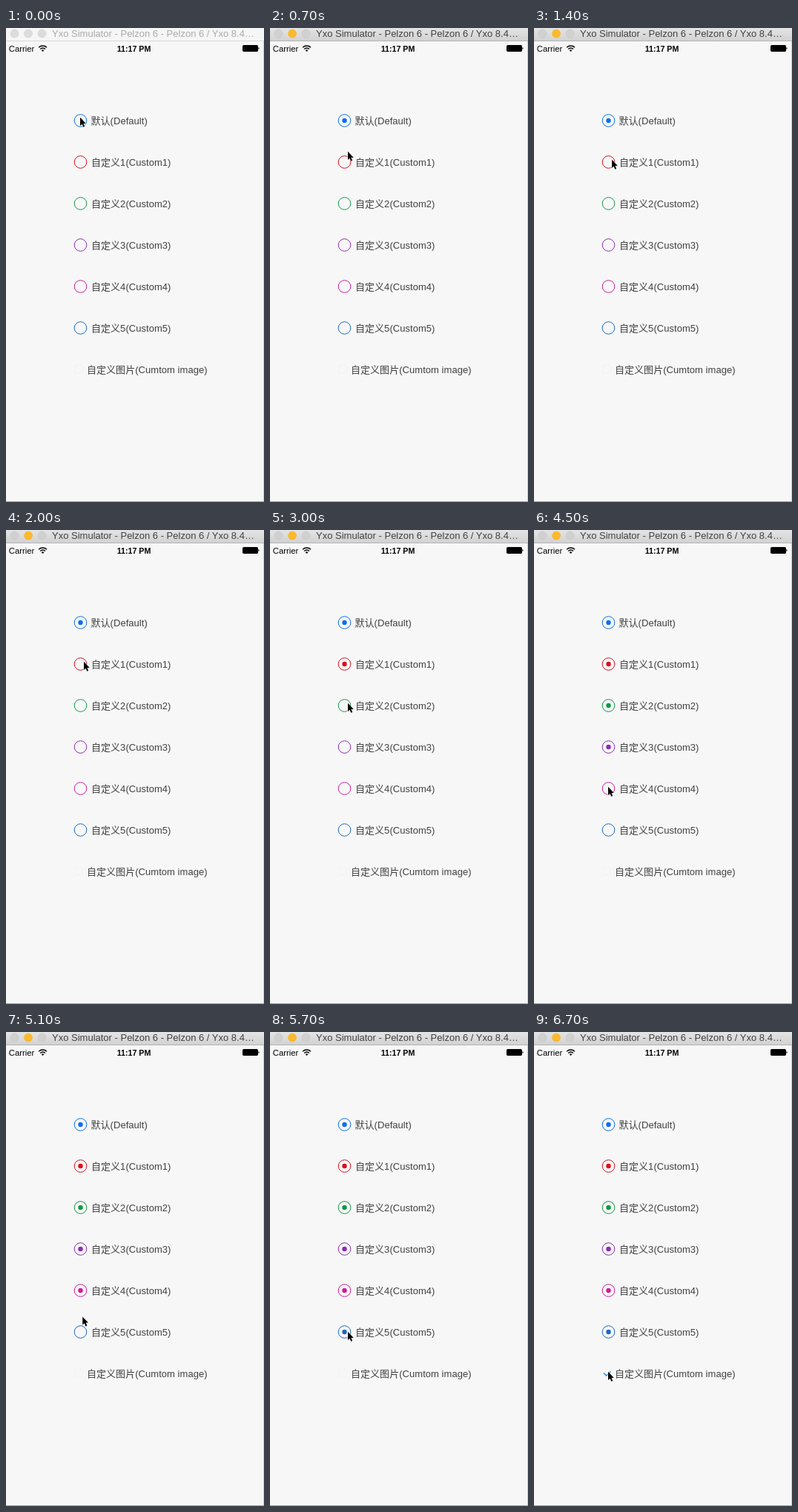
Animation, 348 px wide and 640 px high, one loop 6.8 s. Source, as an HTML page:

```html
<!DOCTYPE html>
<html lang="zh">
<head>
<meta charset="utf-8">
<style>
html, body { margin: 0; width: 100%; height: 100%; overflow: hidden; background: #f7f7f7; }
svg { display: block; }
text { font-family: "Liberation Sans", "Noto Sans CJK SC", "Noto Sans CJK", sans-serif; }
.label { font-size: 13px; font-weight: 300; letter-spacing: .04px; fill: #404040; }
</style>
</head>
<body>
<svg width="348" height="640" viewBox="0 0 348 640">
  <defs>
    <linearGradient id="chrome" x2="0" y2="1">
      <stop stop-color="#e4e4e4"/><stop offset="1" stop-color="#d2d2d2"/>
    </linearGradient>
  </defs>
  <rect width="348" height="640" fill="#f7f7f7"/>
  <rect id="bar" width="348" height="17"/>
  <path id="barLine" d="M0 17.5H348"/>
  <g id="lights" stroke-width=".6">
    <circle cx="11.5" cy="7.5" r="5.5"/><circle cx="30" cy="7.5" r="5.5"/><circle cx="48.5" cy="7.5" r="5.5"/>
  </g>
  <text id="title" x="62" y="12" font-size="13">Yxo Simulator - Pelzon 6 - Pelzon 6 / Yxo 8.4…</text>

  <text x="3.8" y="31.5" font-size="11.3">Carrier</text>
  <g fill="none" stroke="#000" stroke-width="1.5">
    <path d="M44.2 26.2a7.6 7.6 0 0 1 10.8 0M46.3 28.4a4.6 4.6 0 0 1 6.6 0"/>
  </g>
  <path d="M49.6 32l-1.8-1.9a2.6 2.6 0 0 1 3.6 0z"/>
  <text x="172.5" y="31.5" font-size="10.7" font-weight="700" text-anchor="middle">11:17 PM</text>
  <rect x="319" y="23" width="21" height="9" rx="1.8"/>
  <path d="M340.5 26a1.6 1.6 0 0 1 0 3z"/>

  <g id="rows"></g>
  <rect x="92.5" y="455" width="11" height="11" rx="2" fill="none" stroke="#efefef" stroke-dasharray="3 2" id="box"/>
  <path id="check" d="M94 460.5l3.5 3.5 6-5.5" fill="none" stroke="#168ee8" stroke-width="1.5"/>
  <text class="label" x="109" y="465.5">自定义图片(Cumtom image)</text>

  <path d="M347.5 18V640" stroke="#d0d0d0"/>
  <path d="M0 639.5H348" stroke="#a0a0a0"/>
  <g id="cursor">
    <path d="M1 1.8V13l2.5-2.3 1.8 4.1 1.9-.8-1.8-4.1h3.4Z" stroke="#fff" paint-order="stroke"/>
  </g>
</svg>
<script>
const $ = id => document.getElementById(id);
const LOOP = 6800, FRAME = 100;

// colour, label, time of the click
const rows = [
  ["#0a70f0", "默认(Default)", 200],
  ["#dc0f1e", "自定义1(Custom1)", 2200],
  ["#0f9a46", "自定义2(Custom2)", 3100],
  ["#8c2cb2", "自定义3(Custom3)", 3900],
  ["#cf1ba0", "自定义4(Custom4)", 4700],
  ["#1b69c0", "自定义5(Custom5)", 5500],
];
$("rows").innerHTML = rows.map(([color, label], i) => {
  const y = 125 + 56 * i;
  return `<circle cx="100.5" cy="${y}" r="8.3" fill="none" stroke="${color}"/>
    <circle class="dot" cx="100.5" cy="${y}" r="3.2" fill="${color}"/>
    <text class="label" x="${i ? 115 : 114.5}" y="${y + 4.5}">${label}</text>`;
}).join("");
const dots = document.querySelectorAll(".dot");

// cursor stops: time, x, y
const path = [
  [0, 99, 119], [300, 99, 119], [700, 104, 165], [1000, 104, 176],
  [2300, 104, 176], [2800, 104, 232], [3200, 104, 232], [3700, 102, 289],
  [4000, 102, 289], [4500, 99, 345], [4800, 99, 345], [5300, 104, 403],
  [5800, 104, 403], [6300, 99, 457], [LOOP, 99, 457],
];

function cursorAt(t) {
  const i = path.findIndex(p => p[0] > t);
  const [t0, x0, y0] = path[i - 1], [t1, x1, y1] = path[i];
  const u = (t - t0) / (t1 - t0), e = u * u * (3 - 2 * u);
  return [x0 + (x1 - x0) * e, y0 + (y1 - y0) * e];
}

function paint(t) {
  const active = t >= 100;
  $("bar").setAttribute("fill", active ? "url(#chrome)" : "#f6f6f6");
  $("barLine").setAttribute("stroke", active ? "#b4b4b4" : "#d8d8d8");
  $("title").setAttribute("fill", active ? "#404040" : "#aaa");
  [...$("lights").children].forEach((c, i) => {
    const lit = active && i === 1;
    c.setAttribute("fill", lit ? "#fdb92c" : active ? "#d0d0d0" : "#dcdcdc");
    c.setAttribute("stroke", lit ? "#f0b030" : active ? "#c4c4c4" : "#d0d0d0");
  });
  dots.forEach((d, i) => d.setAttribute("visibility", t >= rows[i][2] ? "visible" : "hidden"));
  const checked = t >= 6500;
  $("check").setAttribute("visibility", checked ? "visible" : "hidden");
  $("box").setAttribute("visibility", checked ? "hidden" : "visible");
  $("cursor").setAttribute("transform", `translate(${cursorAt(t)})`);
}

const start = performance.now();
function tick() {
  const t = (performance.now() - start) % LOOP;
  paint(Math.floor(t / FRAME) * FRAME);
  requestAnimationFrame(tick);
}
tick();
</script>
</body>
</html>
```
